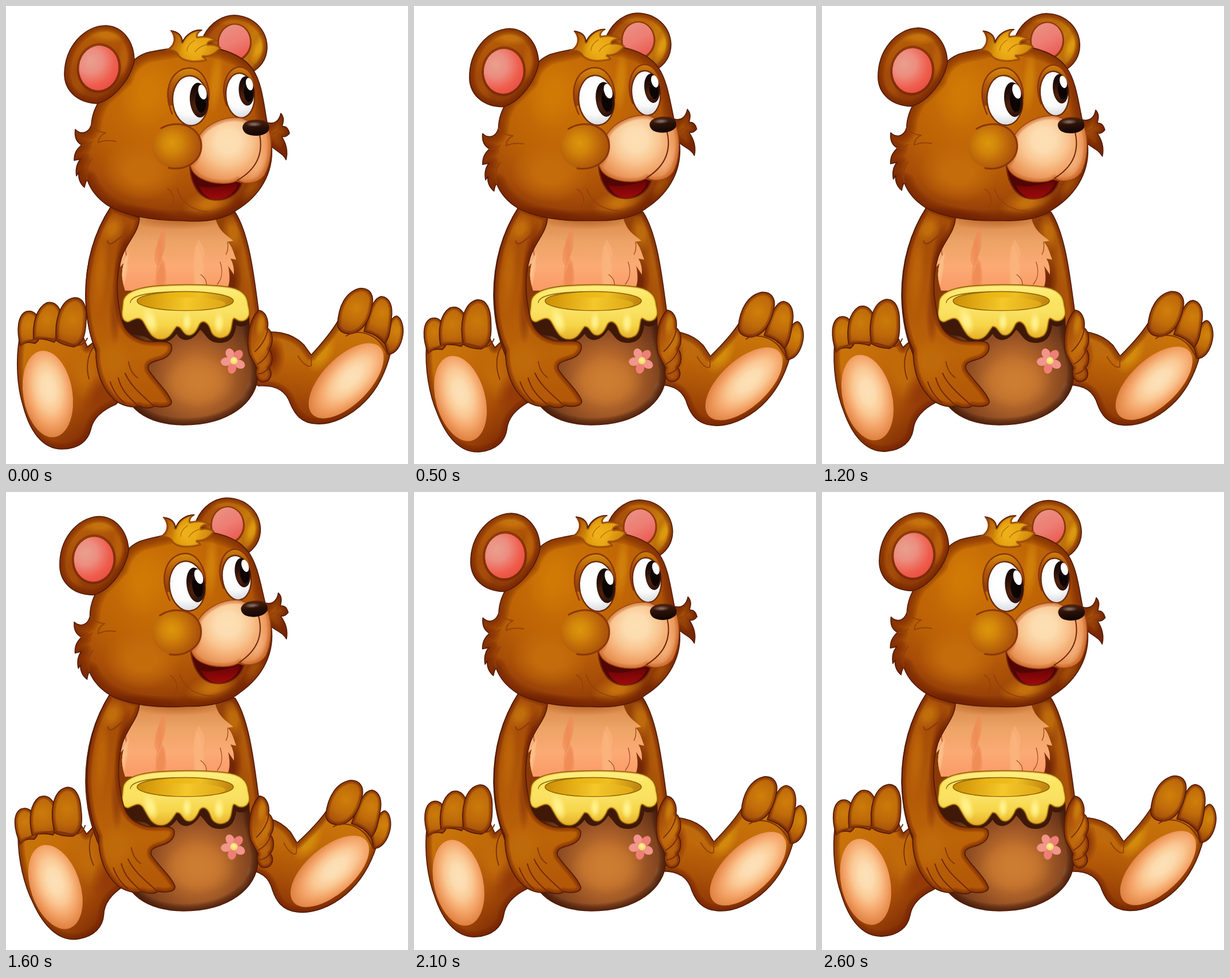
Write an HTML page with a canvas that moves like this. It is 702 px wide and 798 px high and loops after 2.7 s.

```html
<!DOCTYPE html>
<html lang="en">
<head>
<meta charset="utf-8">
<title>Bear with honey pot</title>
<style>
html, body { margin: 0; width: 100%; height: 100%; overflow: hidden; background: #fff; }
canvas { display: block; }
</style>
</head>
<body>
<canvas id="stage" width="702" height="798"></canvas>
<script>
const ctx = document.getElementById('stage').getContext('2d');
const INK = '#521b06', SHADE = '#702304';
const LOOP = 2700, STEP = 100, SWING = 2000 / 3;

function glow(x, y, r, ...colors) {
  const g = ctx.createRadialGradient(x, y, 0, x, y, r);
  colors.forEach((c, i) => g.addColorStop(i / (colors.length - 1), c));
  return g;
}

function ramp(x1, y1, x2, y2, ...colors) {
  const g = ctx.createLinearGradient(x1, y1, x2, y2);
  colors.forEach((c, i) => g.addColorStop(i / (colors.length - 1), c));
  return g;
}

function line(d, color = INK, width = 1.6) {
  ctx.strokeStyle = color;
  ctx.lineWidth = width;
  ctx.stroke(new Path2D(d));
}

function fill(d, paint) {
  ctx.fillStyle = paint;
  ctx.fill(new Path2D(d));
}

// Filled shape with a darkened inner edge and an outline; detail() is clipped to it.
function solid(d, paint, edge = 26, detail, shade = SHADE, ink = INK) {
  const path = new Path2D(d);
  ctx.save();
  ctx.clip(path);
  ctx.fillStyle = paint;
  ctx.fill(path);
  if (detail) detail();
  ctx.strokeStyle = shade;
  ctx.globalAlpha = 0.16;
  for (let k = 1; k <= 6; k++) {
    ctx.lineWidth = edge * k / 6;
    ctx.stroke(path);
  }
  ctx.restore();
  line(d, ink);
}

function oval(x, y, rx, ry, turn, paint, ink, width = 1.5) {
  ctx.beginPath();
  ctx.ellipse(x, y, rx, ry, turn, 0, Math.PI * 2);
  ctx.fillStyle = paint;
  ctx.fill();
  if (ink) {
    ctx.strokeStyle = ink;
    ctx.lineWidth = width;
    ctx.stroke();
  }
}

// Elliptical patch of colour that fades out; color is #rrggbb.
function soft(x, y, rx, ry, turn, color, core = 0.3) {
  ctx.save();
  ctx.translate(x, y);
  ctx.rotate(turn);
  ctx.scale(rx, ry);
  const g = ctx.createRadialGradient(0, 0, core, 0, 0, 1);
  g.addColorStop(0, color);
  g.addColorStop(1, color + '00');
  ctx.fillStyle = g;
  ctx.fillRect(-1, -1, 2, 2);
  ctx.restore();
}

function turned(x, y, angle, draw) {
  ctx.save();
  ctx.translate(x, y);
  ctx.rotate(angle);
  ctx.translate(-x, -y);
  draw();
  ctx.restore();
}

function sole(x, y, long, wide, turn) {
  ctx.save();
  ctx.translate(x, y);
  ctx.rotate(turn);
  ctx.scale(wide / long, 1);
  oval(0, 0, long, long, 0, glow(4, -10, long * 1.1, '#fce1b9', '#fcdcb0', '#fac792', '#f4a468', '#e08445'));
  ctx.restore();
}

function leftLeg() {
  solid('M24 575C16 620 20 665 30 697C41 738 62 772 98 772C126 772 143 758 148 738C152 718 168 704 192 694L225 660L190 600L154 585L142 594L130 565L60 560Z',
    ramp(50, 590, 155, 740, '#c8730a', '#c06808', '#ab5208', '#853006'), 22, () => {
      soft(135, 635, 30, 55, -0.2, '#c06a0a');
      soft(170, 680, 35, 45, 0.5, '#943b08');
    });
  solid('M25 592C18 565 20 538 36 532C49 529 58 540 60 556C62 573 58 584 50 588Q36 583 25 592Z', glow(40, 555, 42, '#cb7c0a', '#be6a0a', '#99450a'), 11);
  solid('M48 581C46 553 53 526 71 517C86 513 98 526 97 548C95 567 90 580 84 586Q66 578 48 581Z', glow(72, 545, 47, '#cb7c0a', '#be6a0a', '#99450a'), 11);
  solid('M88 583C84 550 94 511 120 508C137 508 142 528 140 548C139 570 136 590 118 594C104 592 94 588 88 583Z', glow(116, 545, 54, '#ca7b0a', '#bc680a', '#97430a'), 13);
  line('M24 593C48 574 86 576 112 589Q133 597 142 579', '#7c300a', 2);
  sole(73, 676, 76, 43, -0.16);
  line('M153 594C141 610 140 632 145 650', '#78300a', 1.8);
}

function rightLeg() {
  solid('M425 575C465 560 500 570 520 590L533 608C546 594 566 572 580 548L640 545L672 602C665 632 652 664 626 690C602 714 570 730 542 728C515 727 504 710 497 694C490 673 475 660 441 662L415 645Z',
    ramp(540, 560, 520, 720, '#c8740a', '#c06808', '#ab5208', '#8e3706'), 22, () => {
      soft(500, 597, 38, 22, 0.5, '#bd690d');
      soft(462, 610, 26, 40, 0, '#862f06');
      soft(552, 605, 20, 38, 0.55, '#d38a0c');
    });
  solid('M660 582C666 561 672 541 682 540C691 543 695 560 693 573C690 593 680 607 667 607Z', glow(682, 565, 42, '#d0840a', '#c06c0a', '#97430a'), 10);
  solid('M625 567C634 535 640 508 656 506C671 508 676 524 673 545C671 567 669 580 661 588Q648 572 625 567Z', glow(657, 535, 46, '#ce7f0a', '#bf6b0a', '#97430a'), 11);
  solid('M579 556C580 522 594 498 617 492C634 490 642 502 640 517C637 543 626 566 604 571C589 572 581 566 579 556Z', glow(612, 526, 50, '#cf800a', '#bf6b0a', '#9b470a'), 12);
  line('M594 575C611 562 649 567 666 607', '#7c300a', 2);
  sole(594, 653, 83, 41, Math.PI / 4);
  line('M510 610C518 623 527 630 533 627L533 608', '#8f3f0a', 1.7);
}

function torso() {
  solid('M183 350C153 396 139 450 139 505C140 550 148 580 160 610L205 690L440 640L441 530C433 470 425 398 400 359Z',
    ramp(200, 360, 430, 500, '#8a3908', '#8a3908', '#944208', '#ab5308'), 16, () => {
      soft(397, 395, 20, 34, -0.2, '#bd6a0c');
      soft(419, 445, 14, 75, -0.12, '#b05a0b');
      soft(392, 485, 20, 48, 0.1, '#742707');
    });
}

function chest() {
  const fur = 'M232 368C228 386 216 400 202 409L211 407C203 424 202 438 199 455L206 447C201 464 202 477 208 496L386 494C392 481 391 469 388 453L398 468Q399 452 392 440L402 442C397 429 395 418 387 411L397 409C385 399 371 392 365 368Z';
  ctx.save();
  fill(fur, ramp(300, 370, 300, 495, '#d98a4a', '#eda466', '#fbaa74', '#fa9a66'));
  ctx.clip(new Path2D(fur));
  const tones = ['#fdc28c', '#f08d56', '#fbb57c'];
  ctx.globalAlpha = 0.6;
  for (let i = 0; i < 24; i++) {
    const x = 208 + i * 61 % 182, y = 378 + 76 * Math.abs(Math.sin(i * 12.9));
    const lean = (x - 300) * 0.14, len = 44 + i * 7 % 20;
    fill(`M${x} ${y}q${lean - 13} ${len * 0.7} ${lean} ${len}q${lean * 0.3 + 13} ${-len * 0.4} ${-lean} ${-len}Z`, tones[i % 3]);
  }
  ctx.globalAlpha = 1;
  soft(300, 368, 90, 22, 0, '#c06c2e');
  ctx.restore();
  line('M340 468C349 474 351 481 350 492M374 446C379 462 378 474 369 485M387 411Q389 425 384 433M211 407Q207 424 210 434', '#a34a1e', 1.3);
}

function flower() {
  [-117, -48, 27, 101, 173].forEach((deg, i) => {
    const a = deg * Math.PI / 180;
    oval(397 + 12.5 * Math.cos(a), 618 + 13.5 * Math.sin(a), 9.5, 7.4, a, i % 2 ? '#ee7f76' : '#f2958a');
  });
  oval(398, 618, 6.5, 6.5, 0, glow(398, 617, 7, '#fff3a0', '#f2d563'));
}

function pot() {
  solid('M203 540C206 566 219 578 232 589L205 650C204 700 245 729 310 730C388 730 439 691 440 642C441 608 424 588 424 538Z',
    glow(335, 650, 150, '#ce7f32', '#bd6d2c', '#945024', '#6c371a', '#4f250f'), 24, () => {
      soft(337, 655, 65, 45, 0, '#cc7d31', 0.15);
      soft(416, 685, 9, 14, 0.6, '#8b5430');
      soft(424, 662, 7, 11, 0.4, '#82502d');
    }, '#3b1607');
  fill('M203 545L204 562C220 577 240 572 248 579C264 592 287 588 298 571C306 587 326 586 339 564C350 572 352 588 375 587C393 586 400 574 402 556Q412 562 422 554L424 540Z', '#3f1808');
}

function honey() {
  solid('M204 516C205 501 222 492 258 488C300 484 350 485 385 489C411 492 422 503 423 520Q426 532 425 538C421 551 409 552 400 545C393 541 398 567 386 575C375 582 361 578 357 565C353 552 344 546 338 555C332 569 325 577 315 573C307 569 306 558 298 559C292 566 287 580 272 581C253 582 247 563 239 550C232 539 222 548 213 551C202 550 201 537 203 527Z',
    ramp(300, 485, 300, 580, '#fff08a', '#fbe560', '#fae163', '#f6d548', '#e6b02a'), 6, () => {
      soft(252, 548, 13, 26, -0.3, '#fff08a');
      soft(372, 552, 10, 20, 0, '#fff08a');
      soft(316, 550, 9, 18, 0, '#fff08a');
    }, '#d59a16', '#8a5a08');
  oval(313, 514, 84, 16.5, 0, ramp(230, 500, 390, 530, '#c98c08', '#e9b413', '#efbf20', '#c08510'), '#8d6005', 1.6);
  oval(314, 519, 69, 11, 0, ramp(250, 510, 380, 530, '#d79b0b', '#f4c82b', '#dfa716'));
  line('M217 517C218 503 252 499 294 498', '#8d6410', 1.3);
}

function leftArm() {
  solid('M183 350C153 396 139 450 139 505C140 546 147 578 157 599C156 641 169 668 190 687C207 699 224 700 232 697C243 702 255 701 259 697C277 701 290 697 289 689C282 670 259 651 249 634C245 622 257 620 267 617C283 613 292 603 289 591C282 580 262 588 240 583C214 576 204 560 200 539C192 500 192 470 202 438C211 411 232 395 233 369Z',
    ramp(165, 370, 215, 690, '#a44c08', '#a95108', '#b35a08', '#bc6408', '#b25808'), 16, () => {
      soft(185, 388, 20, 28, 0.5, '#c06e0c');
      soft(164, 465, 15, 80, 0.08, '#bb6308');
      soft(205, 430, 14, 55, 0.2, '#822f06');
      soft(190, 535, 11, 60, 0, '#98440a');
      soft(188, 618, 34, 42, 0, '#bf6a0a');
    });
  line('M208 640C218 663 238 678 258 697M196 648C202 672 217 684 231 697M182 655C188 672 195 681 207 692', '#75290a', 2);
  line('M214 620C216 633 221 642 230 648M201 402C189 412 179 420 177 409', '#88370a', 1.8);
}

function rightHand() {
  solid('M441 530C453 531 459 546 457 561C467 569 467 588 460 598C468 609 465 625 459 630C467 641 462 655 448 655C438 654 434 640 438 631L425 607C419 585 423 548 441 530Z',
    ramp(424, 580, 466, 600, '#a34e0a', '#c06a0c', '#ab530a'), 11, () => {
      soft(445, 555, 9, 24, 0.15, '#c8790d');
      soft(450, 592, 9, 25, 0.4, '#c4720d');
      soft(450, 624, 9, 14, 0.4, '#b6620c');
    });
  line('M457 561C456 577 446 592 435 602M460 598C457 610 448 619 439 624M459 630Q452 640 441 641', '#75290a', 1.8);
}

function ears() {
  solid('M345 52C358 27 380 16 399 16C434 18 456 43 456 73C455 97 441 110 425 118L370 90Z',
    ramp(360, 30, 450, 90, '#a14a0a', '#b65d0a', '#c57a0c', '#b0600a'), 18, () => {
      soft(441, 75, 12, 30, 0.4, '#dc980f');
      soft(395, 25, 36, 10, 0, '#bb680c');
    });
  oval(399, 64, 30, 33.5, 0.1, '#8e380a');
  oval(399, 63, 27, 30.5, 0.1, ramp(385, 35, 412, 92, '#ea8f82', '#ed7d72', '#ea5950'));
}

function leftEar() {
  solid('M158 170C124 168 102 147 102 118C103 70 137 34 175 34C206 36 224 64 224 96C218 126 188 164 158 170Z',
    ramp(150, 40, 180, 165, '#b86008', '#ab5208', '#984208', '#8c3806'), 22, () => {
      soft(176, 50, 36, 14, 0.1, '#c4720d');
      soft(206, 91, 12, 38, 0.08, '#b75e0b');
      soft(123, 134, 15, 29, -0.4, '#a44c0a');
    });
  oval(162, 108, 38.5, 43.5, 0.14, ramp(150, 65, 170, 155, '#8f3b0a', '#842f08', '#7c2a07'));
  oval(162, 108, 34.5, 39, 0.14, glow(148, 96, 63, '#e9a08d', '#ec8d80', '#ef5e4d', '#e4463c'));
}

function tuft() {
  solid('M278 78C297 69 296 54 288 43C302 45 308 53 308 63C314 49 328 41 342 42C335 46 333 50 334 54C346 52 360 53 369 61C358 60 353 63 352 67C363 66 371 69 375 73C367 84 355 90 344 88Q349 91 350 95C332 99 309 98 301 87C298 80 290 77 278 78Z',
    ramp(290, 50, 370, 90, '#a8520a', '#dc960a', '#e8a614', '#c87b0a'), 6, () => {
      soft(327, 72, 24, 25, 0.5, '#eeb01a');
    }, SHADE, '#9a4a0a');
  line('M288 43C302 45 308 53 308 63C314 49 328 41 342 42');
  line('M329 60Q316 68 316 78M351 67Q337 70 330 80', '#b8740c', 1.4);
}

function eye(x, y, rx, ry, px, py, pr) {
  oval(x, y, rx, ry, -0.07, glow(x - 2, y - 7, ry * 1.1, '#fff', '#fff', '#fbfbfc', '#dcdfe3'), '#6c2a08', 2.4);
  oval(px, py, pr, pr * 1.9, -0.08, glow(px - 3, py + 10, pr * 2, '#58260c', '#32140a', '#180905'));
  oval(px + 3, py + 3, pr * 0.58, pr * 1.18, -0.08, '#0d0503');
  oval(px + pr * 0.38, py - pr * 0.88, pr * 0.44, pr * 0.82, -0.25, '#fff');
}

function eyes() {
  fill('M284 174C274 134 295 108 322 108C344 110 357 137 354 163Z', ramp(320, 108, 320, 165, '#d58b0c', '#b15a0a', '#94400a'));
  line('M290 188C272 143 290 108 322 108C344 110 357 137 354 163', '#8a360a', 2.4);
  fill('M381 163C376 128 389 106 408 106C426 108 437 130 435 151Z', ramp(408, 106, 408, 155, '#cf800c', '#a9500a', '#94400a'));
  line('M385 173C372 136 388 106 409 106C427 108 437 130 435 151', '#8a360a', 2.4);
  eye(322, 165, 31, 43.5, 337, 164, 16);
  eye(409, 156, 25, 39, 420, 148, 13.5);
}

function muzzle() {
  fill('M321 278C323 312 337 337 367 338C390 338 405 326 411 309Z', '#520604');
  fill('M337 313C350 319 373 316 405 308C401 328 382 338 363 337C349 334 341 325 337 313Z', ramp(365, 310, 365, 338, '#6c0405', '#a00a0b'));
  line('M321 280C323 312 337 338 368 338C391 338 407 325 412 309', '#74260a', 2.2);
  solid('M322 278C334 268 338 248 336 228C349 206 384 189 414 196L460 218C466 242 463 274 451 295C438 312 414 311 405 303C393 312 362 311 342 301C330 295 324 287 322 278Z',
    glow(388, 236, 82, '#fce0b3', '#fcdcb0', '#f9c590', '#f0a267', '#dc8143'), 14, () => {
      soft(439, 274, 15, 33, 0.4, '#f2ad76');
    }, '#c4642a', '#a04714');
  line('M443 225C448 251 443 281 405 303', '#6d280c', 2);
  fill('M413 211C414 200 432 196 447 199C459 201 462 211 458 218C450 228 429 228 419 222C415 219 413 215 413 211Z',
    ramp(435, 198, 437, 226, '#542510', '#281008', '#100503'));
  soft(433, 206, 14, 4.5, 0, '#81695e', 0.2);
}

function cheek() {
  oval(298, 244, 43, 39, -0.1, glow(290, 239, 47, '#dc960c', '#d2860a', '#c06c0a', '#ac540a'));
  line('M271 213C303 195 342 212 341 245C340 271 313 288 284 282', '#8a370a', 3);
}

function head() {
  ears();
  solid('M205 125C210 106 223 90 244 82C265 76 289 75 307 70C345 65 409 76 432 112C447 135 450 170 456 203C469 207 477 200 480 187C487 195 484 203 482 210C489 209 493 213 495 222C490 228 486 229 481 227C489 239 493 253 489 268C484 257 475 255 464 245C467 290 445 330 402 356C379 373 343 377 307 374C255 374 207 365 177 347C158 334 147 318 142 303C139 306 138 311 137 316C129 309 126 300 127 290L123 296C121 283 124 274 130 267L119 269C119 255 125 248 132 242C123 237 119 229 121 215C131 225 144 222 149 207C150 190 156 174 168 158Z',
    glow(275, 150, 245, '#cb7206', '#c66c06', '#bb6206', '#a64c08', '#7e2d06'), 36, () => {
      soft(246, 150, 46, 66, 0.2, '#d07a06', 0.2);
      soft(236, 287, 68, 52, 0.1, '#c46c0c', 0.35);
      soft(354, 345, 48, 25, -0.2, '#c4700d', 0.2);
      soft(433, 320, 15, 33, 0.65, '#bd670c');
      soft(366, 132, 13, 58, 0.1, '#d07e0a');
      soft(218, 367, 100, 20, 0.12, '#742508');
      soft(476, 220, 15, 28, 0, '#c0680c');
    });
  leftEar();
  line('M149 207Q159 220 174 221Q162 226 161 238Q175 232 192 236M132 242Q143 244 151 236M142 303Q137 282 151 266M464 224Q475 220 481 210M464 233Q474 234 481 227', '#923e0b', 1.7);
  tuft();
  eyes();
  muzzle();
  cheek();
  line('M282 318C294 326 296 341 287 353M299 318C306 346 330 357 355 359', '#964109', 1.7);
}

function draw(ms) {
  const phase = ms / SWING % 1;
  const swing = 1 - Math.abs(1 - 2 * phase);
  ctx.fillStyle = '#fff';
  ctx.fillRect(0, 0, 702, 798);
  turned(480, 300, 0.1 * swing, rightLeg);
  turned(152, 603, -0.21 * swing, leftLeg);
  torso();
  chest();
  pot();
  honey();
  flower();
  turned(190, 370, -0.024 * swing, leftArm);
  turned(400, 370, -0.012 * swing, rightHand);
  turned(302, 250, -0.08 * swing, head);
}

ctx.lineJoin = ctx.lineCap = 'round';
const start = performance.now();
let shown = -1;
function tick() {
  const ms = Math.floor((performance.now() - start) % LOOP / STEP) * STEP;
  if (ms !== shown) draw(shown = ms);
  requestAnimationFrame(tick);
}
tick();
</script>
</body>
</html>
```
